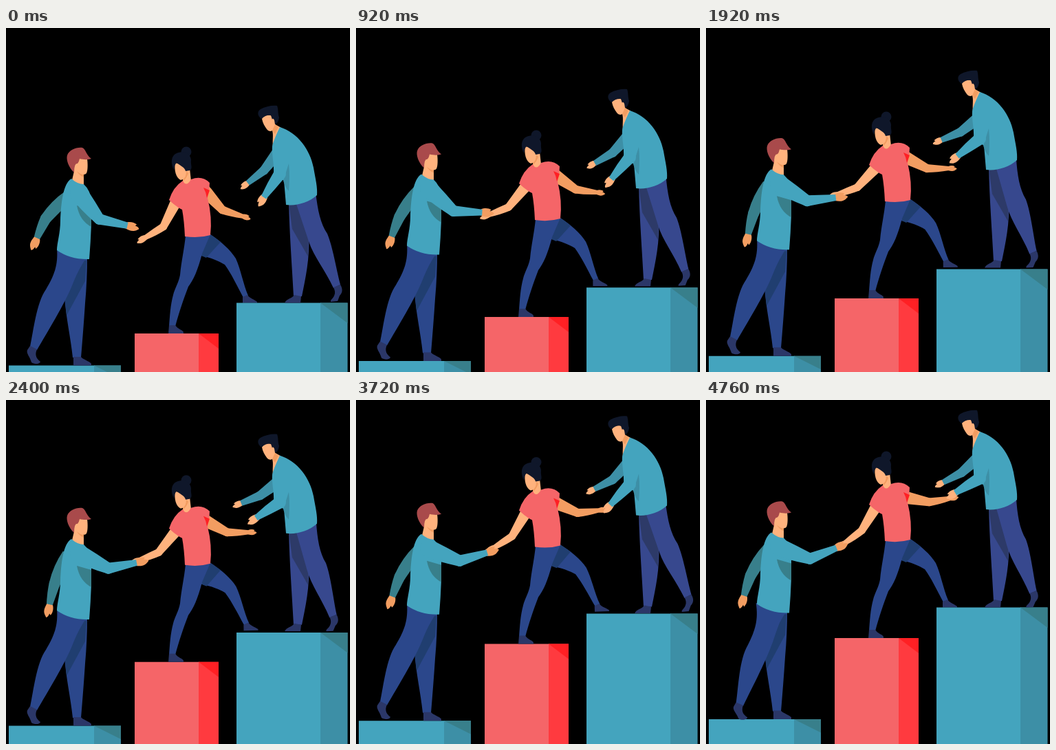
Animation of 500 by 500 pixels, one loop 4840 ms. Source, as an HTML page without scripts:

```html
<!DOCTYPE html>
<html lang="en">
<head>
<meta charset="utf-8">
<title>Climbing together</title>
<style>
  html, body { margin: 0; height: 100%; overflow: hidden; background: #000; }
  svg { display: block; width: 100vw; height: 100vh; }

  .lift { animation: lift 4840ms cubic-bezier(.333, .4, .667, 1) infinite; }
  .late { animation-timing-function: cubic-bezier(.333, .35, .667, 1); }
  @keyframes lift { to { translate: 0 var(--rise); } }

  /* A joint turns about its own position through seven poses, in degrees. */
  .joint { animation: pose 4840ms linear infinite; }
  @keyframes pose {
    0% { rotate: calc(var(--a) * 1deg); }
    9.1% { rotate: calc(var(--b) * 1deg); }
    28.9% { rotate: calc(var(--c) * 1deg); }
    49.6% { rotate: calc(var(--d) * 1deg); }
    63.6% { rotate: calc(var(--e) * 1deg); }
    76.9% { rotate: calc(var(--f) * 1deg); }
    98.3%, 100% { rotate: calc(var(--g) * 1deg); }
  }

  .teal { fill: #44a4be; }
  .teal-side { fill: #3d8fa6; }
  .teal-shade { fill: #387f8b; }
  .red { fill: #f56568; }
  .red-side { fill: #ff3a3f; }
  .red-shade { fill: #ff2024; }
  .skin { fill: #ffb27d; }
  .tan { fill: #f29d61; }
  .jeans { fill: #2b478b; }
  .jeans-shade { fill: #203e70; }
  .slacks { fill: #37488e; }
  .slacks-shade { fill: #2d3a68; }
  .shoe { fill: #2b3768; }
  .dark-hair { fill: #0f172a; }
  .red-hair { fill: #a94a4b; }
</style>
</head>
<body>
<svg viewBox="0 0 500 500" role="img" aria-label="Three people helping each other up rising steps">
  <defs>
    <path id="hand" d="M-2 -4.500C3 -7 9 -7 13 -4.500L11 -2.500C14 -2 17 -1 17.500 1C15 3 14 4 12 5C8 7 3 6 -2 4.500Z"/>
  </defs>

  <!-- Middle: woman on the red step -->
  <g class="lift" style="--rise:-98px">
    <path class="red" d="M187 444H281V700H187Z"/>
    <path class="red-side" d="M280 444H309V700H280Z"/>
    <path class="red-shade" d="M280 444H309V466Z"/>

    <g class="joint" style="translate:246px 255px;--a:117;--b:121;--c:138;--d:129;--e:126;--f:120.5;--g:121">
      <path class="skin" d="M0 -8L38 -5.500A5.500 5.500 0 0 1 38 5.500L0 8Z"/>
      <g class="joint skin" style="translate:38px 0;--a:32;--b:34;--c:25;--d:29;--e:24.5;--f:27.5;--g:22.5">
        <path d="M0 -5.500Q14 -6 31 -3.500V3.500Q14 5 0 5.500A5.500 5.500 0 0 1 0 -5.500Z"/>
        <use href="#hand" transform="translate(31) scale(.8 -.75)"/>
      </g>
    </g>

    <g class="joint" style="translate:292px 240px;--a:47.5;--b:42;--c:26.6;--d:28;--e:28.5;--f:24.3;--g:11">
      <path class="tan" d="M-8 -9H0L33 -6A6 6 0 0 1 33 6L0 9H-8Z"/>
      <g class="joint tan" style="translate:33px 0;--a:-30;--b:-26;--c:-26.6;--d:-28;--e:-29.5;--f:-31;--g:-21">
        <path d="M0 -6L32 -3V3Q14 6 0 6A6 6 0 0 1 0 -6Z"/>
        <use href="#hand" transform="translate(32) scale(.65)"/>
      </g>
    </g>

    <g class="joint" style="translate:285px 312px;--a:0;--b:-.5;--c:0;--d:-1;--e:-2;--f:-2;--g:0">
      <g transform="translate(-285 -312)">
        <path class="jeans" d="M270 298L297 300C312 310 326 322 334 335C341 350 345 373 352 389L345 392C335 373 328 358 318 344C310 339 298 334 284 331Z"/>
        <path class="shoe" d="M344 391L351 388C354 393 362 395 365 398V399.500H344Z"/>
        <path class="jeans-shade" d="M288 300H297L312 311L291 334L284 331Z"/>
      </g>
    </g>
    <path class="jeans" d="M261 302C259 322 255 338 253 359C251 370 245 379 243 388C239 402 238 420 237 434L246 434C251 415 258 394 265 376C272 367 279 352 285 328L297 300Z"/>
    <path class="shoe" d="M237 432L246 432C250 438 257 439 258 442V444H236Z"/>

    <path class="skin" d="M246 196C244 206 247 218 254 221L257 220V227Q264 231 269 222L267 204L258 199Z"/>
    <path class="tan" d="M257 220Q262 217 262 208L265 211Q263 218 257 223Z"/>
    <circle class="dark-hair" cx="262" cy="180" r="7.500"/>
    <path class="dark-hair" d="M244 206C238 194 241 183 251 181C260 178 269 184 269 192C268 199 272 204 267 207L261 208C260 203 255 201 248 196Q245 198 244 206Z"/>
    <path class="red" d="M257 222Q262 232 269 220Q285 214 296 225Q296 236 293 247Q300 275 297 301Q280 306 260 303Q259 280 256 264L252 262Q243 256 237 250Q243 231 257 222Z"/>
    <path class="red-shade" d="M287 232L296 236L292 247Q291 239 287 232Z"/>
  </g>

  <!-- Left: man on the low step -->
  <g class="lift" style="--rise:-26.5px">
    <path class="teal" d="M4 490.500H129V700H4Z"/>
    <path class="teal-side" d="M128 490.500H167V700H128Z"/>
    <path class="teal-shade" d="M128 490.500H167V510Z"/>

    <g class="joint" style="translate:83px 246px;--a:129;--b:126;--c:113;--d:108;--e:113;--f:119;--g:117">
      <path class="teal-shade" d="M0 -12L40 -8A8 8 0 0 1 40 8Q15 10 -9 3Z"/>
      <g class="joint" style="translate:40px 0;--a:-15;--b:-9;--c:-8;--d:-5;--e:-6;--f:-9;--g:-9.500">
        <path class="teal-shade" d="M0 -8L33 -4V4.500Q14 8 0 8A8 8 0 0 1 0 -8Z"/>
        <use class="tan" href="#hand" transform="translate(33)"/>
      </g>
    </g>

    <path class="jeans" d="M86 330H118C118 355 117 378 115 400C113 430 111 455 109 479H97C94 450 87 420 85 390Z"/>
    <path class="jeans-shade" d="M114 338L85 388L88 418L115 368L117 338Z"/>
    <path class="shoe" d="M98 478L109 478C112 482 121 484 124 488V490.500H98Z"/>
    <g class="joint" style="translate:95px 340px;--a:0;--b:0;--c:0;--d:0;--e:0;--f:0;--g:-4">
      <g transform="translate(-95 -340)">
        <path class="jeans" d="M74 320C76 345 70 360 58 380C44 400 40 440 35 463L45 468C60 442 85 402 97 372C103 357 109 347 113 333Z"/>
        <path class="shoe" d="M35 462L45 467C41 476 45 481 50 485C49 489 41 489 37 486C35 478 29 473 31 468Z"/>
      </g>
    </g>

    <path class="skin" d="M104 188L118 190C119 198 119 207 117 211C115 214 110 213 106 211L113 213V229Q103 227 96 221L99 208C96 201 99 196 103 197Z"/>
    <path class="tan" d="M103 208Q108 213 113 213V217Q106 214 103 208Z"/>
    <path class="red-hair" d="M99 210C91 203 87 191 89 185C92 177 102 173 111 174C116 176 116 184 124 190C118 192 111 191 107 190Q106 195 104 197Q99 196 99 210Z"/>
    <path class="teal" d="M95 219Q104 227 113 227Q123 236 124 252V285Q123 312 121 336Q94 337 74 323C74 313 79 298 79 280C80 254 83 226 95 219Z"/>
    <path class="teal-shade" d="M103 258L124 264V289Q107 280 103 258Z"/>

    <g class="joint" style="translate:106px 240px;--a:52;--b:49;--c:36;--d:27;--e:23.5;--f:22;--g:21">
      <path class="teal" d="M0 -13Q25 -11 48 -8A8 8 0 0 1 48 8Q20 13 0 13A13 13 0 0 1 0 -13Z"/>
      <g class="joint" style="translate:48px 0;--a:-39;--b:-42;--c:-37;--d:-38.5;--e:-38.5;--f:-38.6;--g:-43">
        <use class="tan" href="#hand" transform="translate(42)"/>
        <path class="teal" d="M0 -8L42 -4.500V4.500L0 8A8 8 0 0 1 0 -8Z"/>
      </g>
    </g>
  </g>

  <!-- Right: man on the high step -->
  <g class="lift late" style="--rise:-98px">
    <path class="teal" d="M335 399.500H458V700H335Z"/>
    <path class="teal-side" d="M457 399.500H496.500V700H457Z"/>
    <path class="teal-shade" d="M457 399.500H496.500V429Z"/>
  </g>
  <g class="lift" style="--rise:-98px">
    <g class="joint" style="translate:391px 184px;--a:125;--b:122;--c:138;--d:140;--e:129;--f:130;--g:135">
      <path class="teal-side" d="M0 -10L28 -6.500A6.500 6.500 0 0 1 28 6.500L-3 7Z"/>
      <g class="joint" style="translate:28px 0;--a:17;--b:21;--c:19;--d:18;--e:24.5;--f:23;--g:17.5">
        <use class="skin" href="#hand" transform="translate(30) scale(.78 -.75)"/>
        <path class="teal-side" d="M0 -6.500L30 -4V4L0 6.500A6.500 6.500 0 0 1 0 -6.500Z"/>
      </g>
    </g>

    <path class="slacks" d="M411 252L440 300C442 335 435 365 430 390H418C416 350 412 300 411 252Z"/>
    <path class="slacks-shade" d="M411 254L416 292L439 332L440 300L425 252Z"/>
    <path class="shoe" d="M419 388L429 390L428 399.500H405C407 394 416 393 419 388Z"/>
    <g class="joint" style="translate:436px 255px;--a:0;--b:0;--c:2.6;--d:2.6;--e:.3;--f:-.7;--g:2.6">
      <g transform="translate(-436 -255)">
        <path class="slacks" d="M420 250L450 238C453 265 457 284 467 299C475 318 480 350 486 373L476 378C464 352 447 332 440 310Z"/>
        <path class="shoe" d="M476 377L486 373C490 380 489 385 485 389L482 397L472 398C471 395 475 394 477 389C479 385 478 381 476 377Z"/>
      </g>
    </g>

    <path class="skin" d="M372 132C376 125 386 125 388 130C391 132 392 137 391 140L400 145Q399 162 388 175C387 161 389 156 387 149C385 151 381 150 379 147C376 143 373 138 372 132Z"/>
    <path class="tan" d="M387 149L391 140L396 144L391 154Z"/>
    <path class="dark-hair" d="M371 132C365 127 365 121 370 118C377 114 387 112 394 113C396 117 395 125 397 130C396 136 394 139 391 140L390 134Q388 130 387 133L385 127Q378 126 371 132Z"/>
    <path class="teal" d="M398 144C424 152 442 177 447 203C450 220 453 232 452 243C440 254 421 259 407 257L404 222L389 212C390 197 386 184 387 172Q388 165 398 144Z"/>
    <path class="teal-side" d="M411 197L403 222Q406 232 411 237Q413 215 411 197Z"/>
    <g class="joint" style="translate:398px 212px;--a:124;--b:123;--c:137;--d:146.5;--e:142.4;--f:133;--g:149.5">
      <use class="skin" href="#hand" transform="translate(40) scale(.95 -.95)"/>
      <path class="teal" d="M0 -9Q20 -7 41.500 -4V4.500Q20 8 0 9A9 9 0 0 1 0 -9Z"/>
    </g>
  </g>
</svg>
</body>
</html>
```
